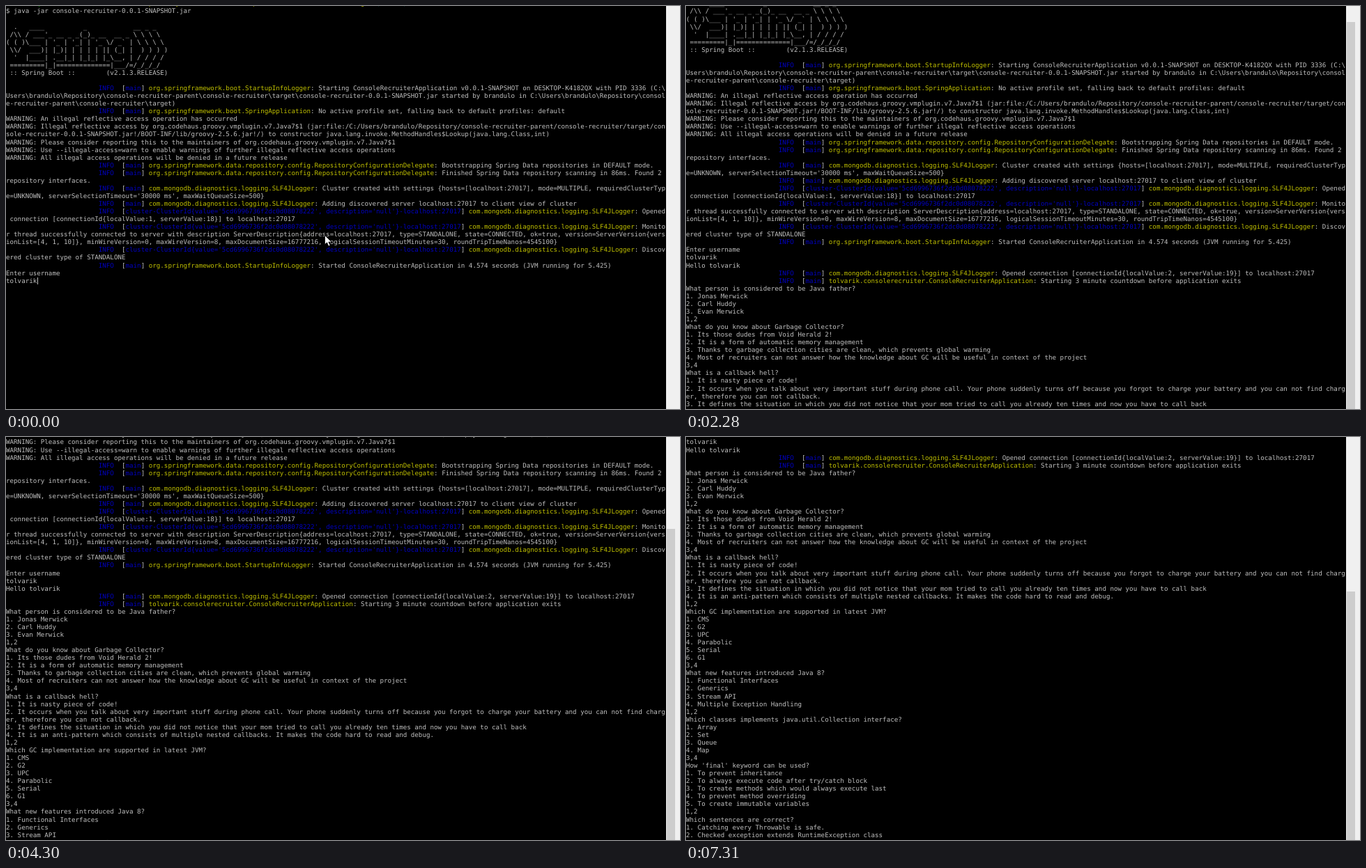
Recreate the animation shown at these times as an HTML page. Size 967x579 px, loop 8 s.

```html
<!DOCTYPE html>
<html lang="en">
<head>
<meta charset="utf-8">
<title>Console recruiter</title>
<style>
  html, body { margin: 0; width: 967px; height: 579px; overflow: hidden; background: #000; }
  body { position: relative; }
  #screen {
    position: absolute; left: 0; top: -8.6px; margin: 0; color: #bfbfbf;
    font: 9.194px/11.065px "DejaVu Sans Mono", monospace;
    text-rendering: geometricPrecision; font-variant-ligatures: none; white-space: pre;
  }
  .blue { color: #0000bf; }
  .yellow { color: #bfbf00; }
  .green { color: #00bf00; }
  .magenta { color: #bf00bf; }
  .cyan { color: #00bfbf; }
  #caret { position: absolute; width: 1px; height: 10px; background: #bfbfbf; }
  #track { position: absolute; left: 947px; top: 0; width: 20px; height: 579px; background: #f0f0f0; }
  #thumb { position: absolute; left: 1px; width: 12px; height: 600px; background: #cdcdcd; }
  #mouse { position: absolute; left: 0; top: 0; }
</style>
</head>
<body>
<pre id="screen">
brandulo@DESKTOP-K4182QX MINGW64 ~/Repository/console-recruiter-parent/console-recruiter/target (master)
$ java -jar console-recruiter-0.0.1-SNAPSHOT.jar

  .   ____          _            __ _ _
 /\\ / ___'_ __ _ _(_)_ __  __ _ \ \ \ \
( ( )\___ | '_ | '_| | '_ \/ _` | \ \ \ \
 \\/  ___)| |_)| | | | | || (_| |  ) ) ) )
  '  |____| .__|_| |_|_| |_\__, | / / / /
 =========|_|==============|___/=/_/_/_/
 :: Spring Boot ::        (v2.1.3.RELEASE)

INFO [main] org.springframework.boot.StartupInfoLogger: Starting ConsoleRecruiterApplication v0.0.1-SNAPSHOT on DESKTOP-K4182QX with PID 3336 (C:\Users\brandulo\Repository\console-recruiter-parent\console-recruiter\target\console-recruiter-0.0.1-SNAPSHOT.jar started by brandulo in C:\Users\brandulo\Repository\console-recruiter-parent\console-recruiter\target)
INFO [main] org.springframework.boot.SpringApplication: No active profile set, falling back to default profiles: default
WARNING: An illegal reflective access operation has occurred
WARNING: Illegal reflective access by org.codehaus.groovy.vmplugin.v7.Java7$1 (jar:file:/C:/Users/brandulo/Repository/console-recruiter-parent/console-recruiter/target/console-recruiter-0.0.1-SNAPSHOT.jar!/BOOT-INF/lib/groovy-2.5.6.jar!/) to constructor java.lang.invoke.MethodHandles$Lookup(java.lang.Class,int)
WARNING: Please consider reporting this to the maintainers of org.codehaus.groovy.vmplugin.v7.Java7$1
WARNING: Use --illegal-access=warn to enable warnings of further illegal reflective access operations
WARNING: All illegal access operations will be denied in a future release
INFO [main] org.springframework.data.repository.config.RepositoryConfigurationDelegate: Bootstrapping Spring Data repositories in DEFAULT mode.
INFO [main] org.springframework.data.repository.config.RepositoryConfigurationDelegate: Finished Spring Data repository scanning in 86ms. Found 2 repository interfaces.
INFO [main] com.mongodb.diagnostics.logging.SLF4JLogger: Cluster created with settings {hosts=[localhost:27017], mode=MULTIPLE, requiredClusterType=UNKNOWN, serverSelectionTimeout='30000 ms', maxWaitQueueSize=500}
INFO [main] com.mongodb.diagnostics.logging.SLF4JLogger: Adding discovered server localhost:27017 to client view of cluster
INFO [cluster] com.mongodb.diagnostics.logging.SLF4JLogger: Opened connection [connectionId{localValue:1, serverValue:18}] to localhost:27017
INFO [cluster] com.mongodb.diagnostics.logging.SLF4JLogger: Monitor thread successfully connected to server with description ServerDescription{address=localhost:27017, type=STANDALONE, state=CONNECTED, ok=true, version=ServerVersion{versionList=[4, 1, 10]}, minWireVersion=0, maxWireVersion=8, maxDocumentSize=16777216, logicalSessionTimeoutMinutes=30, roundTripTimeNanos=4545100}
INFO [cluster] com.mongodb.diagnostics.logging.SLF4JLogger: Discovered cluster type of STANDALONE
INFO [main] org.springframework.boot.StartupInfoLogger: Started ConsoleRecruiterApplication in 4.574 seconds (JVM running for 5.425)
Enter username
tolvarik
Hello tolvarik
INFO [main] com.mongodb.diagnostics.logging.SLF4JLogger: Opened connection [connectionId{localValue:2, serverValue:19}] to localhost:27017
INFO [main] tolvarik.consolerecruiter.ConsoleRecruiterApplication: Starting 3 minute countdown before application exits
What person is considered to be Java father?
1. Jonas Merwick
2. Carl Huddy
3. Evan Merwick
1,2
What do you know about Garbage Collector?
1. Its those dudes from Void Herald 2!
2. It is a form of automatic memory management
3. Thanks to garbage collection cities are clean, which prevents global warming
4. Most of recruiters can not answer how the knowledge about GC will be useful in context of the project
3,4
What is a callback hell?
1. It is nasty piece of code!
2. It occurs when you talk about very important stuff during phone call. Your phone suddenly turns off because you forgot to charge your battery and you can not find charger, therefore you can not callback.
3. It defines the situation in which you did not notice that your mom tried to call you already ten times and now you have to call back
4. It is an anti-pattern which consists of multiple nested callbacks. It makes the code hard to read and debug.
1,2
Which GC implementation are supported in latest JVM?
1. CMS
2. G2
3. UPC
4. Parabolic
5. Serial
6. G1
3,4
What new features introduced Java 8?
1. Functional Interfaces
2. Generics
3. Stream API
4. Multiple Exception Handling
1,2
Which classes implements java.util.Collection interface?
1. Array
2. Set
3. Queue
4. Map
3,4
How 'final' keyword can be used?
1. To prevent inheritance
2. To always execute code after try/catch block
3. To create methods which would always execute last
4. To prevent method overriding
5. To create immutable variables
1,2
Which sentences are correct?
1. Catching every Throwable is safe.
2. Checked exception extends RuntimeException class
</pre>
<div id="caret"></div>
<div id="track"><div id="thumb"></div></div>
<svg id="mouse" width="12" height="18"><path d="M.5 .5V13.5L3.5 10.8L5.8 16L8 15L5.8 10H10Z" fill="#fff" stroke="#000" stroke-width=".7"/></svg>
<script>
const LOOP = 8000, COLS = 171, ROWS = 54, CHAR_W = 5.535, LINE_H = 11.065, TOP = 2.5;
const THREAD = "cluster-ClusterId{value='5cd6996736f2dc0d08078222', description='null'}-localhost:27017";
const [screen, caret, thumb, mouse] =
  ["screen", "caret", "thumb", "mouse"].map(id => document.getElementById(id));

// Wrap the transcript at the terminal width; row 0 is the prompt above the top edge.
const rows = screen.textContent.trimEnd().split("\n").flatMap(line => {
  const text = line.replace(/^INFO \[/, " ".repeat(24) + "INFO  [").replace("[cluster]", `[${THREAD}]`);
  return text.match(new RegExp(`.{1,${COLS}}`, "g")) || [""];
});

const span = (color, text) => `<span class="${color}">${text}</span>`;
const colorize = row => row
  .replace(/^( +)INFO  \[(.*?)\] ([\w.]+):/, (_, pad, thread, logger) =>
    `${pad}${span("blue", "INFO")}  [${span("blue", thread)}] ${span("yellow", logger)}:`)
  .replace(/^(\S+@\S+) (MINGW64) (\S+) (\(.+\))$/, (_, user, system, path, branch) =>
    [span("green", user), span("magenta", system), span("yellow", path), span("cyan", branch)].join(" "));

// [time, caret row, caret column]
const STEPS = [
  [0, 35, 8], [60, 37, 0], [300, 43, 0], [820, 43, 1], [1000, 43, 2], [1120, 43, 3],
  [1420, 49, 0], [1850, 49, 1], [1980, 49, 2], [2160, 49, 3], [2280, 56, 0],
  [3400, 57, 0], [3490, 64, 0], [4240, 65, 0], [4300, 70, 0], [5300, 76, 0],
  [6130, 77, 0], [6190, 83, 0], [7310, 88, 0]
];
let shown;

function showStep(step) {
  if (step === shown) return;
  shown = step;
  const [, row, col] = step;
  const scroll = Math.max(0, row - ROWS + 1);
  const lines = rows.slice(0, row + 1);
  lines.push((rows[row + 1] || "").slice(0, col));
  screen.innerHTML = lines.slice(scroll, scroll + ROWS).map(colorize).join("\n");
  caret.style.left = col * CHAR_W + 0.6 + "px";
  caret.style.top = Math.round(TOP + (row - scroll) * LINE_H + 0.7) + "px";
  thumb.style.display = scroll ? "block" : "none";
  thumb.style.top = Math.round(586 * scroll / (scroll + ROWS) - 8) + "px";
}

function moveMouse(t) {
  const p = Math.min(1, Math.max(0, (t - 240) / 880));
  const eased = p * p * (3 - 2 * p);
  mouse.style.transform = `translate(${457 + 470 * eased}px, ${329 + 255 * eased}px)`;
}

function frame(now) {
  const t = now % LOOP;
  showStep(STEPS.findLast(([start]) => start <= t));
  moveMouse(t);
  requestAnimationFrame(frame);
}
frame(0);
</script>
</body>
</html>
```
